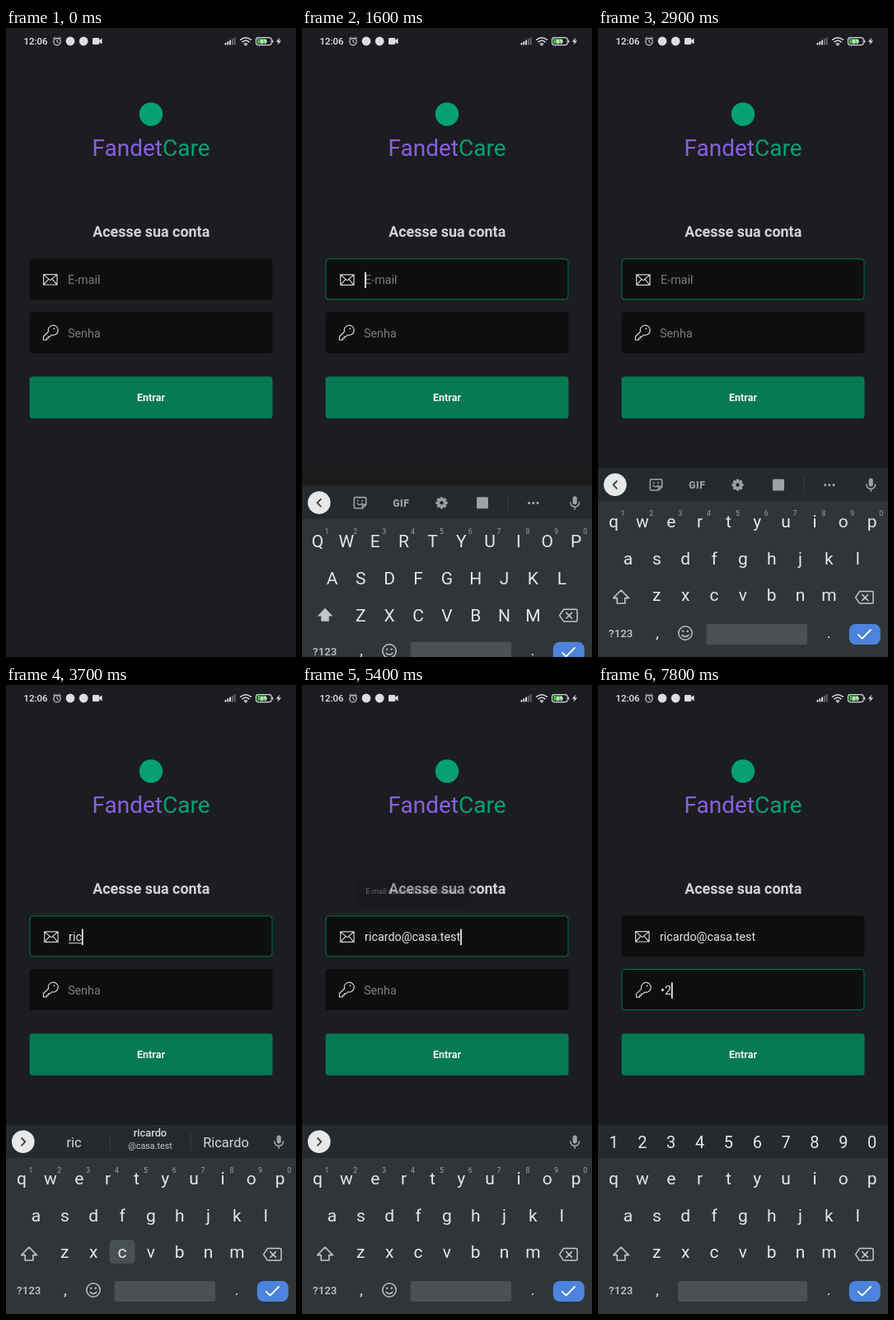
These frames come from a looping animation (352 px wide and 762 px high, 8 s). An HTML page:

```html
<!DOCTYPE html>
<html lang="pt-BR">
<head>
<meta charset="utf-8">
<title>Acesse sua conta</title>
<style>
html, body { margin: 0; width: 100%; height: 100%; overflow: hidden; background: #1c1d21; }
svg { display: block; width: 352px; height: 762px; font-family: Roboto, sans-serif; }
.mid { text-anchor: middle; }
.line { fill: none; stroke-linecap: round; stroke-linejoin: round; }
text { white-space: pre; }
</style>
</head>
<body>
<svg id="stage" viewBox="0 0 352 762"></svg>
<script>
const LOOP = 8000;
const INK = '#e4e6e8', DIM = '#9da2a5', GREEN = '#037a53';
const ROWS = ['qwertyuiop', 'asdfghjkl', 'zxcvbnm'];
const STARTS = [19, 36.5, 71.3], PITCH = 34.85, ROW_STEP = 44.8;

const rect = (x, y, w, h, fill, r = 0, more = '') =>
  `<rect x="${x}" y="${y}" width="${w}" height="${h}" rx="${r}" fill="${fill}" ${more}/>`;
const text = (x, y, size, fill, str, more = '') =>
  `<text x="${x}" y="${y}" font-size="${size}" fill="${fill}" ${more}>${str}</text>`;
const mid = (x, y, size, fill, str, weight = 400) =>
  text(x, y, size, fill, str, `class="mid" font-weight="${weight}"`);
const line = (d, color, w = 1.2) =>
  `<path class="line" d="${d}" stroke="${color}" stroke-width="${w}"/>`;
const dot = (x, y, r, fill, more = '') => `<circle cx="${x}" cy="${y}" r="${r}" fill="${fill}" ${more}/>`;
const ring = (x, y, r, color, w = 1.2) => dot(x, y, r, 'none', `stroke="${color}" stroke-width="${w}"`);
const group = (id, body) => `<g id="${id}">${body}</g>`;

function statusBar() {
  const c = '#dcdde0';
  const bars = [0, 1, 2, 3, 4].map(i =>
    rect(265.5 + i * 2.8, 18 - i * 1.7, 1.9, 2.5 + i * 1.7, i < 3 ? c : '#65666a', .5)).join('');
  return text(21.5, 20.2, 11.4, '#e8e8ea', '12:06', 'font-weight="500"')
    + ring(62, 16.6, 4.2, c, 1.1) + line('M62 14.2V17l1.8 1M57.3 13l2.2-1.9M66.7 13l-2.2-1.9', c, 1)
    + dot(78, 16, 5.4, c) + dot(94.2, 16, 5.4, c)
    + rect(105, 12, 8.2, 8, c, 1.2) + `<path d="M113 15l3.6-2.6v7.2L113 17z" fill="${c}"/>`
    + bars
    + line('M284.8 14.2q6.2-4.8 12.4 0M287 16.8q4-3.2 8 0', c, 1.6) + line('M289.2 19.2q1.8-1.4 3.6 0L291 21z', c, 1.2)
    + rect(303.5, 11.6, 18.6, 9, '#1c1d21', 2.6, `stroke="${c}" stroke-width="1.1"`)
    + rect(305, 13.1, 10.5, 6, '#3fae3d', 1) + rect(323, 14.4, 1.3, 3.4, c, .5)
    + mid(312.8, 18.9, 7.4, '#fff', '69', 700)
    + `<path d="M332.3 11.6l-4.6 5.2h3l-1.3 4 4.7-5.3h-3z" fill="${c}"/>`;
}

function field(id, y, label, icon) {
  return rect(28.5, y, 295, 50, '#0d0f0f', 3.6)
    + rect(29, y + .5, 294, 49, 'none', 3.4, `id="${id}Edge" stroke="${GREEN}"`)
    + group(id + 'In', icon + text(75, y + 30.9, 14.33, '#7a7a82', label, `id="${id}Hint"`)
      + text(75, y + 30.9, 14.33, '#e6e6e9', '', `id="${id}Text"`)
      + rect(75, y + 32.6, 0, 1, '#d8d8dc', 0, `id="${id}Rule"`)
      + rect(75, y + 16, 1.7, 19.5, '#f0f0f2', 0, `id="${id}Caret"`));
}

function form() {
  const c = '#d2d2d8';
  const mail = line('M45.6 298.6h16.4v12.4H45.6zM45.6 298.6l8.2 7 8.2-7M45.6 311l6-6.6M62 311l-6-6.6', c, 1.2);
  const key = line('M51.5 367.8a6 6 0 1 1 4 4l-2 2h-2.1v2h-2v2h-4v-4z', c, 1.2) + dot(58.4, 364.2, .9, c);
  return dot(176, 104.4, 14.2, '#05a170')
    + `<text x="176" y="155.3" font-size="28" class="mid"><tspan fill="#8860e2">Fandet</tspan><tspan fill="#05a170">Care</tspan></text>`
    + mid(176.2, 253.2, 17.92, '#d2d2d7', 'Acesse sua conta', 700)
    + field('user', 279.3, 'E-mail', mail)
    + field('pass', 344, 'Senha', key)
    + rect(28.5, 422.3, 295, 50.6, GREEN, 3.6)
    + mid(176, 452.4, 12.54, '#f2f4f3', 'Entrar', 700)
    + group('toast', rect(65, 235, 143, 33, '#151517', 8) + text(77.5, 253, 9, '#f0f0f0', 'E-mail da conta selecionado'));
}

function letters(upper) {
  return ROWS.map((row, r) => [...row].map((ch, i) =>
    mid(STARTS[r] + i * PITCH, (upper ? 607.3 : 604.7) + r * ROW_STEP, 21, INK, upper ? ch.toUpperCase() : ch)).join('')).join('');
}

const digits = make => [...'1234567890'].map((d, i) => make(d, 19 + i * PITCH)).join('');

function tools() {
  const gear = [0, 45, 90, 135].map(a =>
    rect(167.7, 546.4, 3.6, 14.2, DIM, .8, `transform="rotate(${a} 169.5 553.5)"`)).join('');
  return line('M64.5 546.8h12a1.2 1.2 0 0 1 1.2 1.2v7.6l-4.2 4.4h-9a1.2 1.2 0 0 1-1.2-1.2V548a1.2 1.2 0 0 1 1.2-1.2zM77.5 555.6h-4v4.2M67 554.2q3 3 6 0', DIM, 1.6)
    + dot(67.8, 551, 1, DIM) + dot(73, 551, 1, DIM)
    + text(120.3, 557.8, 12, DIM, 'GIF', 'class="mid" font-weight="900" letter-spacing=".6"')
    + gear + dot(169.5, 553.5, 5.2, DIM) + dot(169.5, 553.5, 2.3, '#242a2d')
    + rect(212, 546.5, 14, 14, DIM, 1.5)
    + rect(250, 543, 1, 21, '#363c3f')
    + [275.6, 280.8, 286].map(x => dot(x, 553.6, 1.6, DIM)).join('');
}

function hints() {
  return text(82.5, 559.6, 16.4, '#d5d8da', '', 'id="hintLeft" class="mid"')
    + mid(175, 547.3, 12.8, '#d5d8da', 'ricardo', 500)
    + mid(175, 562, 10.7, '#c4c8ca', '@casa.test')
    + mid(267, 559.6, 16.4, '#d5d8da', 'Ricardo')
    + rect(126, 543, 1, 21, '#363c3f') + rect(224, 543, 1, 21, '#363c3f');
}

function keyboard() {
  const arrow = 'M28 681l9.4 9.6h-4.6v6.4h-9.6v-6.4h-4.6z';
  return rect(0, 533, 352, 229, '#2f3538') + rect(0, 533, 352, 40, '#242a2d')
    + rect(0, 0, 31, 29, '#495054', 5, 'id="press"')
    + group('bar', dot(20.8, 553.3, 13.8, '#e6e8ea')
      + group('left', line('M22.8 549l-4.3 4.4 4.3 4.4', '#3b4043', 1.8))
      + group('right', line('M19 549l4.3 4.4-4.3 4.4', '#3b4043', 1.8))
      + rect(328.6, 545.4, 5.2, 10, DIM, 2.6) + line('M325.8 553a5.4 5.4 0 0 0 10.8 0M331.2 558.6v2.6', DIM, 1.6))
    + group('tools', tools()) + group('hints', hints())
    + group('nums', digits((d, x) => mid(x, 561.2, 20, INK, d)))
    + group('sups', digits((d, x) => mid(x + 11, 591.2, 8.8, DIM, d)))
    + group('upper', letters(true) + `<path d="${arrow}" fill="#c3c7c9"/>`)
    + group('lower', letters(false) + line(arrow, '#c3c7c9', 1.6))
    + line('M317.6 682.5h15.4q1 0 1 1v12.6q0 1-1 1h-15.4l-5-7.3zM320.8 686.6l6.8 6.8M327.6 686.6l-6.8 6.8', '#c3c7c9', 1.5)
    + mid(27.8, 737.8, 13.4, '#c3c7c9', '?123', 500)
    + mid(72, 738.6, 18, INK, ',') + mid(280, 738.6, 18, INK, '.')
    + group('smile', ring(106, 733, 8.2, '#b9bdbf', 1.6) + dot(103.2, 730.8, 1.2, '#b9bdbf')
      + dot(108.8, 730.8, 1.2, '#b9bdbf') + line('M102 735.4q4 4 8 0', '#b9bdbf', 1.5))
    + rect(131.6, 722, 122.6, 25, '#4b5053', 3, 'id="space"')
    + rect(304.8, 722, 38, 25, '#4c83dc', 8) + line('M315.8 734.8l4.8 4.8 10.4-10.6', '#fff', 1.8);
}

const stage = document.getElementById('stage');
stage.innerHTML = rect(0, 0, 352, 762, '#1c1d21') + statusBar() + form()
  + '<clipPath id="clip"><rect y="533" width="352" height="229"/></clipPath>'
  + rect(0, 533, 352, 229, '#1b1c19', 0, 'id="panel"')
  + `<g clip-path="url(#clip)">${group('board', keyboard())}</g>`;
const $ = id => document.getElementById(id);

// visible spans [from, to, from, to, ...]
const SHOWN = {
  userEdge: [1400, 6000],
  userHint: [0, 3400],
  userCaret: [1400, 1900, 2400, 2900, 3400, 4800, 5300, 5900],
  userRule: [3400, 5400],
  passEdge: [6500, LOOP],
  passHint: [0, 7100],
  passCaret: [6400, 6800, 7100, LOOP],
  passRule: [],
  panel: [1500, LOOP],
  board: [1600, LOOP],
  bar: [1600, 6400],
  left: [1600, 3400],
  right: [3400, 6400],
  tools: [1600, 3400],
  hints: [3400, 5400],
  nums: [6400, LOOP],
  sups: [1600, 6400],
  upper: [1600, 2300],
  lower: [2300, LOOP],
  smile: [1600, 6400]
};

const TYPED = [3400, 3600, 3700, 3800, 4000, 4100, 4300];
const NAME = 'ricardo';
const userText = [[0, '']].concat(TYPED.map((t, i) => [t, NAME.slice(0, i + 1)]), [[5400, NAME + '@casa.test']]);
const passText = [[0, ''], [7100, '1'], [7700, '•2']];

// pressed keys: [time, x, y]
const PRESSES = TYPED.slice(0, 6).map((t, i) => {
  const r = ROWS.findIndex(row => row.includes(NAME[i]));
  return [t, STARTS[r] + ROWS[r].indexOf(NAME[i]) * PITCH, 597 + r * ROW_STEP];
}).concat([[2200, 28, 689.5], [7100, 19, 554], [7700, 54, 554]]);

const at = (steps, t) => steps.reduce((v, s) => t >= s[0] ? s[1] : v, '');
const ramp = (t, a, b) => Math.min(1, Math.max(0, (t - a) / (b - a)));
const within = (spans, t) => spans.some((a, i) => i % 2 === 0 && t >= a && t < spans[i + 1]);

function setField(id, str, focus) {
  const el = $(id + 'Text');
  if (el.textContent !== str) el.textContent = str;
  const w = str ? el.getComputedTextLength() : 0;
  $(id + 'Caret').setAttribute('x', 75 + w);
  $(id + 'Rule').setAttribute('width', w);
  $(id + 'In').setAttribute('transform', `translate(${focus ? 1.1 : 0} ${focus ? .3 : 0})`);
}

function draw(t) {
  for (const id in SHOWN) $(id).style.display = within(SHOWN[id], t) ? '' : 'none';
  setField('user', at(userText, t), within(SHOWN.userEdge, t));
  setField('pass', at(passText, t), within(SHOWN.passEdge, t));
  $('hintLeft').textContent = at(userText, Math.min(t, 5300));

  const drop = 1 - ramp(t, 1550, 1700);
  $('board').setAttribute('transform', `translate(0 ${50 * drop * drop})`);

  const wide = t >= 6400;
  $('space').setAttribute('x', wide ? 97 : 131.6);
  $('space').setAttribute('width', wide ? 157.2 : 122.6);

  const hit = PRESSES.find(p => t >= p[0] && t < p[0] + 100);
  $('press').style.display = hit ? '' : 'none';
  if (hit) {
    $('press').setAttribute('x', hit[1] - 15.5);
    $('press').setAttribute('y', hit[2] - 14.5);
  }
  $('toast').setAttribute('opacity', t < 6000 ? ramp(t, 5300, 5600) : 1 - ramp(t, 6300, 6440));
}

function tick() {
  draw(performance.now() % LOOP);
  requestAnimationFrame(tick);
}
tick();
</script>
</body>
</html>
```
